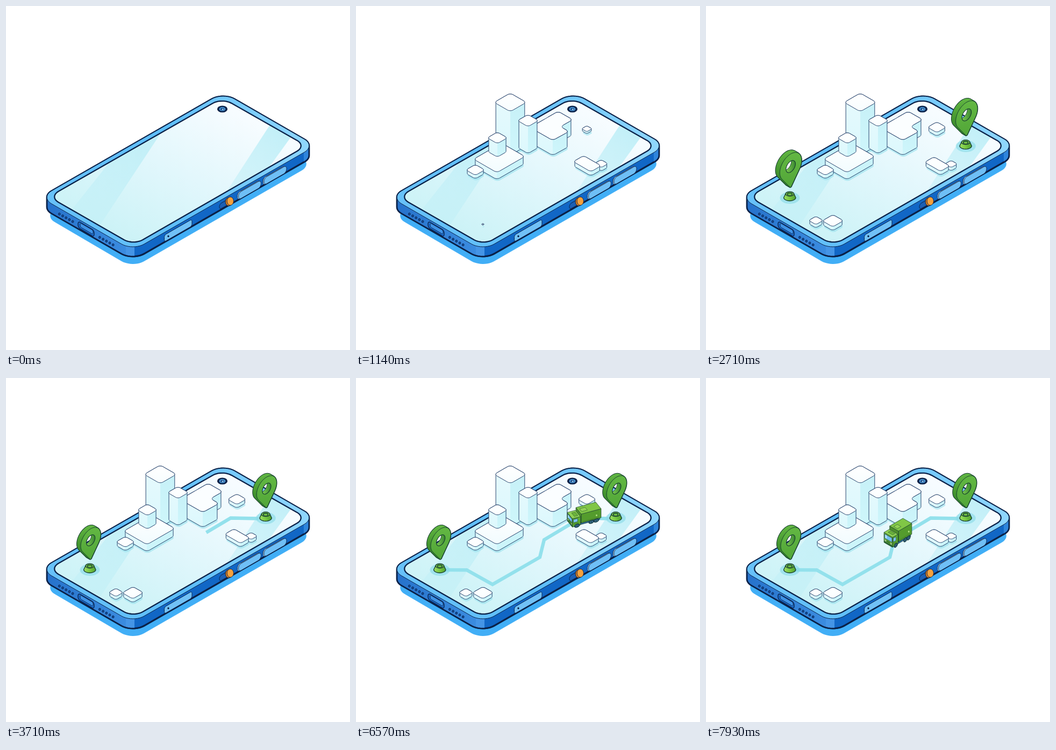
Recreate the animation shown at these times as an HTML page with a canvas. Size 640 px wide and 640 px high, loop 8 s.

```html
<!DOCTYPE html>
<html lang="en">
<head>
<meta charset="utf-8">
<title>Delivery map</title>
<style>
html, body { margin: 0; width: 100%; height: 100%; overflow: hidden; background: #fff; }
canvas { display: block; width: 100vw; height: 100vh; }
</style>
</head>
<body>
<canvas id="stage"></canvas>
<script>
const canvas = document.getElementById('stage');
const ctx = canvas.getContext('2d');
const SIZE = 640, LOOP = 8000;
const NAVY = '#0a2148', LINE = '#1d3a66', EDGE = '#12382f';
const C30 = 0.866;

// ---------- helpers ----------
const smooth = u => (u = Math.min(1, Math.max(0, u)), u * u * (3 - 2 * u));

// Linear lookup in a table of [time, value, value...]
function at(table, t, col = 1) {
  if (t <= table[0][0]) return table[0][col];
  for (let i = 1; i < table.length; i++) {
    const a = table[i - 1], b = table[i];
    if (t <= b[0]) return a[col] + (b[col] - a[col]) * (t - a[0]) / (b[0] - a[0]);
  }
  return table[table.length - 1][col];
}

// Grow past full size, then settle
function pop(t, start, dur = 500, peak = 1.11) {
  const u = (t - start) / dur;
  return u < 0.6 ? peak * smooth(u / 0.6) : peak + (1 - peak) * smooth((u - 0.6) / 0.4);
}

function trace(pts) {
  ctx.beginPath();
  pts.forEach(([x, y], i) => i ? ctx.lineTo(x, y) : ctx.moveTo(x, y));
  ctx.closePath();
}

function shape(pts, fill, line, width = 1) {
  trace(pts);
  paint(fill, line, width);
}

function paint(fill, line, width = 1) {
  if (fill) { ctx.fillStyle = fill; ctx.fill(); }
  if (line) { ctx.strokeStyle = line; ctx.lineWidth = width; ctx.stroke(); }
}

function oval(x, y, rx, ry, fill, line, width) {
  ctx.beginPath();
  ctx.ellipse(x, y, rx, ry, 0, 0, 7);
  paint(fill, line, width);
}

function fade(x0, y0, x1, y1, ...stops) {
  const g = ctx.createLinearGradient(x0, y0, x1, y1);
  stops.forEach((c, i) => g.addColorStop(i / (stops.length - 1), c));
  return g;
}

const shift = (pts, dx, dy) => pts.map(([x, y]) => [x + dx, y + dy]);

// Polygon with rounded corners, as a list of points
function rounded(pts, r) {
  const out = [], n = pts.length, k = 0.45;
  const toward = (a, b, d) => {
    const l = Math.hypot(b[0] - a[0], b[1] - a[1]);
    return [a[0] + (b[0] - a[0]) * d / l, a[1] + (b[1] - a[1]) * d / l];
  };
  pts.forEach((p, i) => {
    const prev = pts[(i + n - 1) % n], next = pts[(i + 1) % n];
    const a = toward(p, prev, r), b = toward(p, next, r);
    const c = toward(p, prev, r * k), d = toward(p, next, r * k);
    for (let j = 0; j <= 10; j++) {
      const u = j / 10, v = 1 - u;
      out.push([0, 1].map(m =>
        v * v * v * a[m] + 3 * v * v * u * c[m] + 3 * v * u * u * d[m] + u * u * u * b[m]));
    }
  });
  return out;
}

// Isometric rectangle: a runs down-right, b runs down-left
function rhomb(cx, cy, a, b, r) {
  const p = (i, j) => [cx + (i * a - j * b) * C30 / 2, cy + (i * a + j * b) / 4];
  return rounded([p(-1, -1), p(1, -1), p(1, 1), p(-1, 1)], r);
}

// Outline of a flat shape pulled down by h
function hull(pts, h) {
  const n = pts.length;
  let l = 0, r = 0;
  pts.forEach((p, i) => { if (p[0] < pts[l][0]) l = i; if (p[0] > pts[r][0]) r = i; });
  const out = [];
  for (let i = l; ; i = (i + 1) % n) { out.push(pts[i]); if (i === r) break; }
  for (let i = r; ; i = (i + 1) % n) { out.push([pts[i][0], pts[i][1] + h]); if (i === l) break; }
  return out;
}

// ---------- phone ----------
const BODY = rounded([[404, 161], [576, 260], [236, 455], [64, 356]], 24);
const GLASS = rounded([[402, 171], [559, 260], [237, 445], [80, 355]], 20);
const SHADE = rounded([[404, 193], [571, 294], [236, 487], [70, 390]], 24);

const edgeY = x => 455 - 0.576 * (x - 236);
function bar(x0, x1, top, h, r, fill) {
  const p = rounded([[x0, edgeY(x0) + top], [x1, edgeY(x1) + top],
    [x1, edgeY(x1) + top + h], [x0, edgeY(x0) + top + h]], r);
  shape(p, fill, NAVY, 1);
}

function phone() {
  ctx.fillStyle = '#fff';
  ctx.fillRect(0, 0, SIZE, SIZE);
  shape(SHADE, '#41aef6');
  const wall = hull(BODY, 18);
  shape(wall, '#1167c6', NAVY, 3.2);
  ctx.save();
  trace(wall);
  ctx.clip();
  ctx.fillStyle = fade(75, 0, 224, 0, '#2672cb', '#3b8ce0');
  ctx.fillRect(60, 330, 163, 150);
  ctx.fillStyle = '#4595e6';
  ctx.fillRect(223, 400, 16, 80);
  ctx.fillStyle = '#2f85dc';
  ctx.fillRect(554, 240, 20, 70);
  ctx.restore();
  shape(wall, null, NAVY, 2.4);
  shape(BODY, fade(80, 360, 560, 250, '#67c1f9', '#5dbefa', '#8fd6fe'), NAVY, 1);

  shape(GLASS, fade(390, 175, 250, 440, '#f7fcff', '#e2f7fc', '#cdf3f7'));
  ctx.save();
  trace(GLASS);
  ctx.clip();
  shape([[197, 285], [291, 232], [172, 412], [112, 392]],
    fade(240, 260, 150, 400, 'rgba(185,237,246,.75)', 'rgba(185,237,246,.3)'));
  shape([[497, 212], [535, 237], [488, 302], [410, 346]],
    fade(510, 225, 430, 340, 'rgba(180,236,246,.8)', 'rgba(185,237,246,.45)'));
  ctx.restore();
  shape(GLASS, null, NAVY, 2.3);

  oval(402.5, 191.8, 9.6, 6.3, NAVY);
  oval(402.5, 191.8, 5.8, 3.7, '#4f9fdf');
  oval(402.5, 192, 3.6, 2.2, '#17437d');
  oval(403.2, 192.4, 1.8, 1.1, '#a9dcfb');

  // charging port and speaker holes
  shape(rounded([[134, 400], [164, 417.5], [164, 430], [134, 412]], 5), '#1c6ccb', NAVY, 1.3);
  shape(rounded([[138, 403.5], [162, 417.5], [162, 425], [138, 411]], 3), '#3f93e6', NAVY, 0.9);
  for (let i = 0; i < 5; i++) {
    oval(99.3 + 6.2 * i, 387 + 3.5 * i, 1.9, 2.1, '#174f9c', NAVY, 0.9);
    oval(174.4 + 6.2 * i, 430.4 + 3.5 * i, 1.9, 2.1, '#174f9c', NAVY, 0.9);
  }

  // tray, slider and keys
  bar(294.5, 346, 5, 12.5, 4, '#71c1f6');
  oval(302, 428.3, 1.6, 1.9, NAVY);
  bar(397, 413, 6.5, 10, 4.5, '#1c5fb4');
  oval(414.5, 364.2, 6.4, 7.8, '#d97d1f', NAVY, 1);
  oval(417.3, 363, 6.2, 7.8, '#f6a13c', NAVY, 0.9);
  for (const x of [430.5, 478]) {
    bar(x, x + 42, 4.5, 14, 6, '#b4e0fd');
    bar(x + 2, x + 44, 6, 13, 6, '#6fbff6');
  }
}

// ---------- city ----------
// centre x, top y, a, b, height, corner, start
const BLOCKS = [
  [287, 179.3, 34.5, 34.5, 81, 6, 360],
  null,
  [320, 213.2, 22.5, 22.5, 50, 5, 470],
  [266.5, 282.5, 50, 60, 13, 6, 400],
  [263, 245.3, 21.5, 21.5, 25, 5, 580],
  [222, 305, 20.2, 20.2, 6.5, 5, 560],
  [429.5, 225.6, 20, 20, 6.5, 5, 990],
  [456, 294, 13.5, 13.5, 6, 4, 800],
  [430.2, 294.2, 34, 20, 7, 5, 840],
  [204.5, 399, 15.5, 15.5, 6, 4, 1180],
  [236, 399.6, 22.5, 23, 7, 5, 1083]
];

function scaled(pts, s, ox, oy) {
  return pts.map(([x, y]) => [ox + (x - ox) * s, oy + (y - oy) * s]);
}

function prism(top, h, front) {
  const wall = hull(top, h);
  const ys = wall.map(p => p[1]), y0 = Math.min(...ys), y1 = Math.max(...ys);
  shape(wall, fade(0, y0, 0, y1, '#e6fafd', '#dcf8fd'));
  ctx.save();
  trace(wall);
  ctx.clip();
  ctx.fillStyle = fade(0, y0, 0, y1, '#c6f0f7', '#cef6fb');
  ctx.fillRect(front, y0, 200, y1 - y0 + 2);
  ctx.restore();
  shape(wall, null, LINE, 0.95);
  shape(top, fade(0, y0, 0, y0 + 45, '#ffffff', '#f3fcfe'), LINE, 0.95);
}

function castShade(foot) {
  shape(shift(foot, 1, 4), 'rgba(150,224,235,.6)');
}

function block(t, [cx, cy, a, b, h, r, start]) {
  const s = pop(t, start);
  if (s < 0.01) return;
  const by = cy + h, top = by - h * s;
  if (h !== 25) castShade(rhomb(cx, by, a * s, b * s, r * s));
  prism(rhomb(cx, top, a * s, b * s, r * s), h * s, cx + (a - b) * s * 0.433);
}

function cornerBlock(t) {
  const s = pop(t, 520), ox = 363, oy = 251, h = 28;
  if (s < 0.01) return;
  const fit = (pts, r) => scaled(rounded(pts, r), s, ox, oy);
  const T = [376, 196], R = [403, 211.5], N = [380.5, 224.5], P = [396, 233.5],
    F = [366, 250], L = [324, 226], Q = [353.5, 209];
  const back = fit([T, R, N, Q], 6), front = fit([Q, P, F, L], 6);
  const fx = ox + (366 - ox) * s;
  castShade(shift(front, 0, h * s));
  prism(back, h * s, ox);
  prism(front, h * s, fx);
  shape(fit([T, R, N, P, F, L], 6), '#fbfeff', LINE, 0.95);
}

// ---------- route ----------
const ROUTE = [[470, 261.5], [418, 260.5], [350, 301], [342, 333.5], [254, 384], [206, 357.3], [166, 357]];
const ROUTE_LEN = ROUTE.slice(1).reduce((n, p, i) => n + Math.hypot(p[0] - ROUTE[i][0], p[1] - ROUTE[i][1]), 0);
const ROUTE_STEPS = [[2850, 0], [3080, 0.03], [3300, 0.1], [3500, 0.18], [3710, 0.29], [4140, 0.56],
  [4570, 0.79], [4790, 0.875], [5140, 0.977], [5360, 1]];

function route(t) {
  const p = at(ROUTE_STEPS, t);
  if (!p) return;
  ctx.beginPath();
  ROUTE.forEach(([x, y], i) => i ? ctx.lineTo(x, y) : ctx.moveTo(x, y));
  ctx.setLineDash([ROUTE_LEN * p, 9999]);
  ctx.lineJoin = 'miter';
  paint(null, '#93e1ec', 6.4);
  ctx.lineJoin = 'round';
  ctx.setLineDash([]);
}

// ---------- markers ----------
const SPOTS = [[156, 357], [483.3, 260.8]];

function glow(t, [x, y]) {
  const s = pop(t, 1330, 700);
  if (s > 0.01) oval(x, y, 18.5 * s, 11 * s, 'rgba(140,220,232,.65)');
}

function base(t, [x, y]) {
  const s = pop(t, 1400, 750);
  if (s < 0.01) return;
  ctx.save();
  ctx.translate(x - 0.2, y);
  ctx.scale(s, s);
  const foot = [];
  for (let i = 0; i <= 12; i++) {
    const a = Math.PI * i / 12;
    foot.push([11.2 * Math.cos(a), 6 * Math.sin(a) - 0.5]);
  }
  shape([[7.6, -8], ...foot, [-7.6, -8]], fade(-11, 0, 11, 0, '#9bdc62', '#78c840', '#4f9f33'), EDGE, 1.3);
  oval(0, -7.4, 7.8, 4.2, '#8fd655', EDGE, 1.2);
  oval(0, -7.2, 4.9, 2.5, '#3c8a31', EDGE, 1.1);
  oval(0, -6.4, 3.2, 1.3, '#79c548');
  ctx.restore();
}

function pin(t, [x, y]) {
  const s = pop(t, 2070, 880, 1.12);
  if (s < 0.01) return;
  const tx = x + 1.6, ty = y - 19, R = 21.5, C = 36;
  const put = (p, q) => [tx + C30 * p * s, ty - (q + p / 2) * s];
  const ring = (r, from, n) => {
    const out = [];
    for (let i = 0; i <= n; i++) {
      const a = from + (2 * Math.PI - 2 * from) * i / n;
      out.push(put(r * Math.sin(a), C - r * Math.cos(a)));
    }
    return out;
  };
  const face = [put(-1, 1), put(1, 1), ...ring(R, Math.acos(R / C), 40)];
  const hole = ring(9.3, 0, 30);
  const dx = -7 * s, dy = -4 * s, n = 10;
  for (let i = 0; i <= n; i++) shape(shift(face, dx * i / n, dy * i / n), null, EDGE, 2);
  const side = fade(tx - 20 * s, ty - 62 * s, tx - 12 * s, ty, '#62b743', '#46972f', '#2f7a2b');
  for (let i = n; i >= 0; i--) shape(shift(face, dx * i / n, dy * i / n), side);
  shape(face, fade(tx, ty - 62 * s, tx, ty, '#63b843', '#52a638'), EDGE, 0.9);
  shape(hole, fade(tx - 8 * s, 0, tx + 8 * s, 0, '#7cca4f', '#3a8831'));
  ctx.save();
  trace(hole);
  ctx.clip();
  const far = shift(hole, dx, dy);
  ctx.save();
  trace(far);
  ctx.clip();
  phone();
  ctx.restore();
  shape(far, null, EDGE, 0.9);
  ctx.restore();
  shape(hole, null, EDGE, 1.1);
}

// ---------- truck ----------
const DRIVE = [[6040, 451, 261.5], [6300, 438, 262.5], [6570, 424.5, 266.7], [6860, 409, 272.8], [8000, 353.5, 305]];
const TURN = [[6040, 45], [6300, 39], [6570, 20], [6860, 8], [7100, 0]];

function truck(t) {
  const s = smooth((t - 6040) / 300);
  if (!s) return;
  const x = at(DRIVE, t, 1), y = at(DRIVE, t, 2);
  const deg = at(TURN, t), a = deg * Math.PI / 180, k = Math.min(1, deg / 20);
  const c = Math.cos(a), n = Math.sin(a), fl = (1 + 0.17 * k) * s, fh = (1 - 0.17 * k) * s;
  // f forward from the middle, w to the near side, z up
  const P = (f, w, z) => {
    f *= fl; w *= s;
    return [x - (n + c) * C30 * f + (c - n) * C30 * w, y + (c - n) / 2 * f + (c + n) / 2 * w - z * fh];
  };
  const dark = '#173d2b';
  const side = (f0, f1, z0, z1, w, fill, lw = 0.7) =>
    shape([P(f0, w, z0), P(f1, w, z0), P(f1, w, z1), P(f0, w, z1)], fill, lw && dark, lw);
  const front = (w0, w1, z0, z1, f, fill, lw = 0.7) =>
    shape([P(f, w0, z0), P(f, w1, z0), P(f, w1, z1), P(f, w0, z1)], fill, lw && dark, lw);
  const roof = (f0, f1, w0, w1, z, fill, lw = 0.7) =>
    shape([P(f0, w0, z), P(f1, w0, z), P(f1, w1, z), P(f0, w1, z)], fill, lw && dark, lw);
  const box = (f0, f1, w, z0, z1, cs, cf, ct) => {
    side(f0, f1, z0, z1, w, cs);
    front(-w, w, z0, z1, f1, cf);
    roof(f0, f1, -w, w, z1, ct);
  };
  const wheel = f => [[3.9, '#1d3f63'], [2.4, '#4f8fc4'], [0.9, '#16314f']].forEach(([r, fill]) => {
    const pts = [];
    for (let i = 0; i < 14; i++) pts.push(P(f + r * Math.cos(i * 0.449), 9.6, 3.6 + r * Math.sin(i * 0.449)));
    shape(pts, fill, dark, 0.6);
  });

  box(-19, 20, 8.6, 3, 7, '#2f6a9c', '#2b5c3a', '#3c7d35');
  box(-20.5, 8, 9.5, 7, 27, '#549c2d', '#4d8f2c', '#80c646');
  side(-17, 6, 9, 10, 9.5, '#447f2a', 0);
  oval(...P(-14, 9.5, 15), 1.4 * s, 1.8 * s, '#b7e583');
  roof(-3, 5, -4, 4, 27.2, '#93d257', 0.5);
  box(9, 20.5, 9.2, 3, 21.5, '#5fae34', '#71bb3e', '#8fd254');
  roof(11, 16, -5, 5, 21.6, '#6cb43b', 0.5);
  side(13, 19, 12, 19, 9.2, '#7cc4f2', 0.6);
  side(11.5, 19.5, 7, 10.5, 9.2, '#4e9430', 0);
  front(-8, 8, 11.5, 19.5, 20.5, '#72bef2', 0.7);
  front(-6.5, -3, 12.5, 18.5, 20.5, '#b5e2fc', 0);
  front(-8.5, 8.5, 3, 5.5, 20.5, '#2f6d38', 0.5);
  front(-7.5, -4.5, 6.5, 8.8, 20.5, '#e9f7c9', 0.4);
  front(4.5, 7.5, 6.5, 8.8, 20.5, '#e9f7c9', 0.4);
  front(-3, 3, 7, 9.5, 20.5, '#3b7f31', 0.4);
  wheel(-13.5);
  wheel(-6.5);
  wheel(14);
}

// ---------- scene ----------
function draw(t) {
  const px = Math.round(SIZE * (window.devicePixelRatio || 1));
  if (canvas.width !== px) canvas.width = canvas.height = px;
  ctx.setTransform(px / SIZE, 0, 0, px / SIZE, 0, 0);
  ctx.lineJoin = 'round';
  phone();
  route(t);
  SPOTS.forEach(p => glow(t, p));
  BLOCKS.forEach(b => b ? block(t, b) : cornerBlock(t));
  SPOTS.forEach(p => base(t, p));
  truck(t);
  SPOTS.forEach(p => pin(t, p));
}

const begin = performance.now();
function tick() {
  draw((performance.now() - begin) % LOOP);
  requestAnimationFrame(tick);
}
tick();
</script>
</body>
</html>
```
